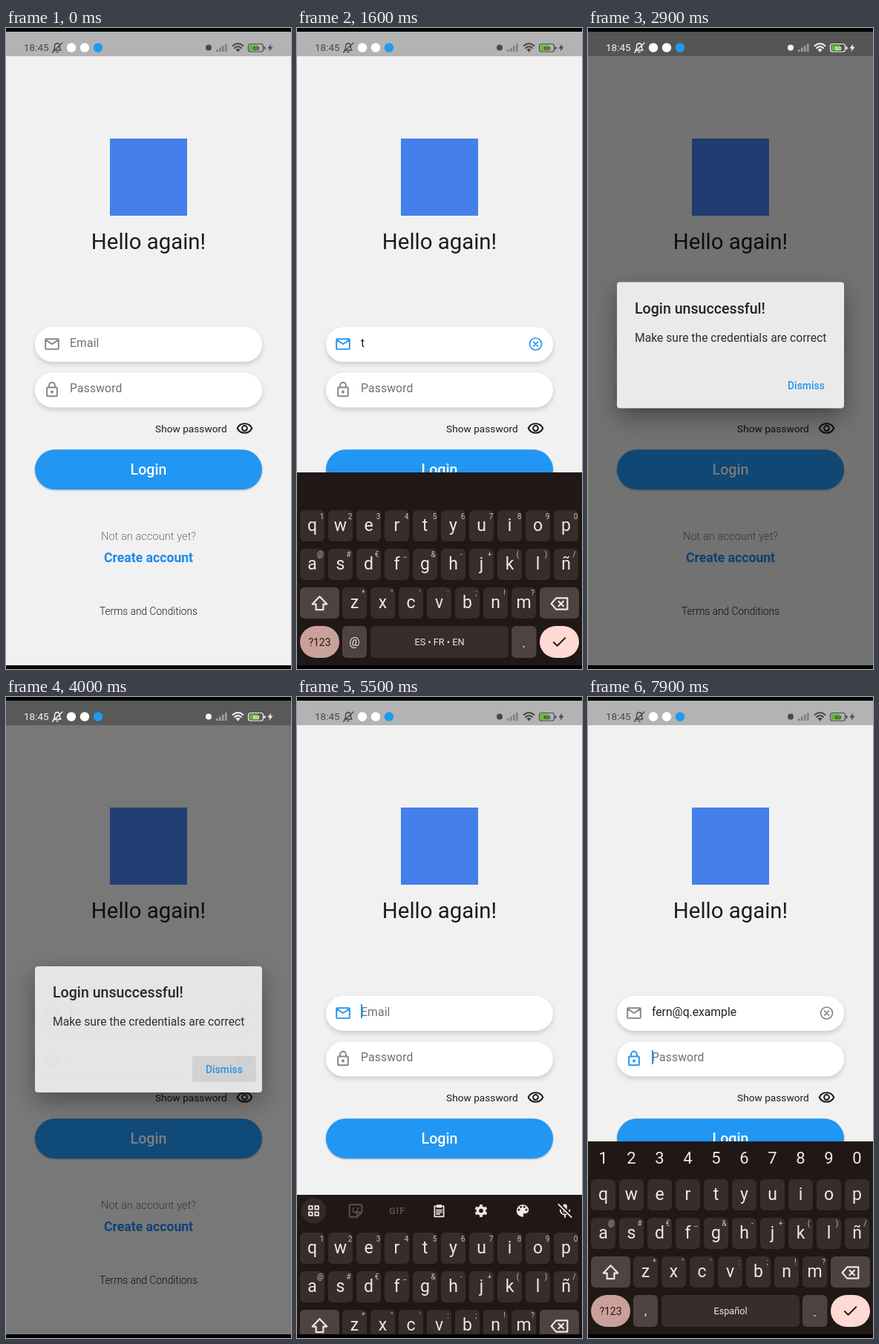
Recreate the animation shown at these times as an HTML page. Size 384x864 px, loop 8 s.

```html
<!DOCTYPE html>
<html lang="en">
<head>
<meta charset="utf-8">
<title>Login screen</title>
<style>
html, body { margin: 0; width: 100%; height: 100%; overflow: hidden; background: #000; }
svg { display: block; width: 100%; height: 100%; font-family: Roboto, "Noto Sans", sans-serif; }
.mid { text-anchor: middle; }
.line { fill: none; stroke: currentColor; stroke-width: 2; stroke-linecap: round; stroke-linejoin: round; }
.field { filter: drop-shadow(0 3px 3px rgba(0,0,0,.16)); }
.button { filter: drop-shadow(0 1.5px 1px rgba(0,0,0,.3)); }
.card { filter: drop-shadow(0 12px 16px rgba(0,0,0,.36)); }
.letter { font-size: 23px; fill: #f3e6e3; text-anchor: middle; }
.hint { font-size: 10px; fill: #cfc2bf; text-anchor: middle; }
</style>
</head>
<body>
<svg id="stage" viewBox="0 0 384 864" preserveAspectRatio="none"></svg>
<script>
const LOOP = 8000;
const EMAIL = 'fern@q.example';
const BLUE = '#2196f3', GREY = '#858585';

const rect = (x, y, w, h, r, fill, more = '') =>
  `<rect x="${x}" y="${y}" width="${w}" height="${h}" rx="${r}" fill="${fill}" ${more}/>`;
const text = (x, y, size, str, fill, more = '') =>
  `<text x="${x}" y="${y}" font-size="${size}" fill="${fill}" ${more}>${str}</text>`;
const dot = (x, y, r, fill) => `<circle cx="${x}" cy="${y}" r="${r}" fill="${fill}"/>`;
const line = (d, width = 2) => `<path class="line" d="${d}" style="stroke-width:${width}"/>`;
// 24-unit icon centred on a point
const icon = (x, y, size, body, color, id = '') =>
  `<g id="${id}" color="${color}" fill="currentColor" transform="translate(${x - size / 2} ${y - size / 2}) scale(${size / 24})">${body}</g>`;

const MAIL = line('M4 5H20Q21 5 21 6V18Q21 19 20 19H4Q3 19 3 18V6Q3 5 4 5ZM3.5 6.5L12 12L20.5 6.5');
const LOCK = line('M6 9H18Q19 9 19 10V20Q19 21 18 21H6Q5 21 5 20V10Q5 9 6 9ZM8 9V6A4 4 0 0 1 16 6V9') + dot(12, 15, 2, 'currentColor');
const EYE = line('M2 11.5C5.7 3 18.3 3 22 11.5C18.3 20 5.7 20 2 11.5Z') +
  '<circle class="line" cx="12" cy="11.5" r="3.5"/>';
const CLEAR = '<circle class="line" cx="12" cy="12" r="8.2" style="stroke-width:1.7"/>' + line('M9 9L15 15M15 9L9 15', 1.7);

function statusBar() {
  return `<g id="status" color="#484848" fill="currentColor">
    ${text(24, 31, 13.5, '18:45', 'currentColor')}
    ${line('M64 30H74L72.5 27.5V24Q72 21 69 20.5Q66 21 65.5 24V27.5ZM68 32.5H70M62.5 33L76 20', 1.4)}
    ${dot(88, 26.5, 6.2, '#fff')}${dot(106, 26.5, 6.2, '#fff')}${dot(124, 26.5, 6.2, '#1e9bf0')}
    ${dot(273, 26.5, 4, 'currentColor')}
    <g opacity=".45">${[0, 1, 2, 3].map(i => rect(283 + 4 * i, 29 - 2.6 * i, 2.6, 3 + 2.6 * i, 0, 'currentColor')).join('')}</g>
    ${line('M305.5 24Q312.5 18 319.5 24M308 27Q312.5 23 317 27', 2)}
    <path d="M309.5 29Q312.5 26.5 315.5 29L312.5 32.5Z"/>
    ${rect(326.5, 21.5, 20, 10.5, 3, 'none', 'stroke="currentColor" stroke-width="1.2"')}
    ${rect(328, 23, 12, 7.5, 1.5, '#62b830')}
    ${text(337, 29.7, 8, '60', 'currentColor', 'class="mid" font-weight="700"')}
    ${rect(347.5, 25, 2, 4, 1, 'currentColor')}
    <path d="M357 21.5L352.5 27.5H355.5L354.5 32L359.5 25.5H356.5Z"/>
  </g>`;
}

function field(name, y, glyph, label) {
  return rect(39, y, 306, 47, 23.5, '#fff', 'class="field"') +
    icon(62, y + 23, 23.5, glyph, GREY, name + 'Icon') +
    text(86, y + 26.5, 15.7, label, '#707070', `id="${name}Label" letter-spacing=".15"`) +
    text(86, y + 26.5, 15.7, '', '#202020', `id="${name}Text"`) +
    icon(321.5, y + 23, 23.5, CLEAR, GREY, name + 'Clear');
}

function page() {
  return rect(0, 5, 384, 854, 0, '#f1f1f1') + rect(0, 5, 384, 33, 0, '#b3b3b3') +
    rect(140, 149, 104, 104, 0, '#447fec') +
    text(192, 298, 29.4, 'Hello again!', '#1c1c1c', 'class="mid"') +
    field('email', 403, MAIL, 'Email') + field('pass', 464.5, LOCK, 'Password') +
    rect(86, 414, 2, 19, 0, BLUE, 'id="caret"') +
    text(201, 545, 13.7, 'Show password', '#1c1c1c') +
    icon(321.5, 540, 23.5, EYE, '#1c1c1c') +
    rect(39, 568.3, 306, 53.7, 26.85, BLUE, 'class="button"') +
    text(192, 602, 19.6, 'Login', '#fff', 'class="mid" font-weight="500"') +
    text(192, 690, 14.7, 'Not an account yet?', '#707070', 'class="mid" font-weight="300"') +
    text(192, 720, 17.64, 'Create account', '#1e88ec', 'class="mid" font-weight="700"') +
    text(192, 791, 13.72, 'Terms and Conditions', '#1c1c1c', 'class="mid" font-weight="300"');
}

function keyRow(letters, hints, x, y, hintDx, hintDy, hintId = '') {
  const col = i => x + 38 * i;
  const each = (list, fn) => [...list].map(fn).join('');
  return each(letters, (c, i) => rect(col(i) - 16.5, y, 33, 42, 6, '#372d2b') +
      `<text class="letter" x="${col(i)}" y="${y + 27.5}">${c}</text>`) +
    `<g id="${hintId}">` + each(hints, (c, i) =>
      `<text class="hint" x="${col(i) + hintDx}" y="${y + hintDy}">${c}</text>`) + '</g>';
}

function tools() {
  const ink = '#f3e6e3', dim = '#574c4a', y = 620.5;
  const squares = [[5, 5], [14, 5], [5, 14], [14, 14]]
    .map(([a, b]) => line(`M${a} ${b}h5v5h-5Z`)).join('');
  const sticker = line('M5 4H19Q20 4 20 5V14L14 20H5Q4 20 4 19V5Q4 4 5 4ZM20 14H14V20M8 12Q11 16 14 12') +
    dot(9, 9, 1.3, dim) + dot(15, 9, 1.3, dim);
  const clipboard = line('M5 5H19V21H5ZM8 11H16M8 14H16M8 17H13') + rect(8, 2.5, 8, 5, 1, 'currentColor');
  const gear = '<circle cx="12" cy="12" r="5.3" fill="none" stroke="currentColor" stroke-width="4.2"/>' +
    '<circle cx="12" cy="12" r="8.3" fill="none" stroke="currentColor" stroke-width="3" pathLength="48" stroke-dasharray="4 4" stroke-dashoffset="-2"/>';
  const palette = '<path d="M12 3a9 9 0 0 0 0 18 1.5 1.5 0 0 0 1.1-2.5c-1-1.2 0-2.5 1.1-2.5H16a5 5 0 0 0 5-5c0-4.4-4-8-9-8z"/>' +
    [[6.5, 10.5], [9.5, 6.5], [14.5, 6.5], [17.5, 10.5]].map(([a, b]) => dot(a, b, 1.5, '#1f1817')).join('');
  const mic = rect(9, 2.5, 6, 12, 3, 'currentColor') + line('M5.5 11A6.5 6.5 0 0 0 18.5 11M12 18V21') +
    '<path d="M3 2L22 21" stroke="#1f1817" stroke-width="5"/>' + line('M3 3L21 21');
  return '<g id="tools">' + dot(22.5, y, 17, '#332a28') +
    icon(22.5, y, 22, squares, ink) + icon(79, y, 25, sticker, dim) +
    text(135, 625, 13, 'GIF', dim, 'class="mid" font-weight="700" letter-spacing=".8"') +
    icon(191.5, y, 21, clipboard, ink) + icon(248, y, 21, gear, ink) +
    icon(304, y, 22, palette, ink) + icon(361, y, 23, mic, ink) + '</g>';
}

function keyboard() {
  const key = '#372d2b', special = '#4e4341', ink = '#f3e6e3';
  const digits = [...'1234567890'].map((c, i) =>
    `<text class="letter" style="font-size:22px" x="${20.5 + 38 * i}" y="629">${c}</text>`).join('');
  return '<g id="keyboard">' + rect(0, 599, 384, 262, 0, '#1f1817') +
    tools() + `<g id="digits">${digits}</g>` +
    keyRow('qwertyuiop', '1234567890', 20.5, 650, 13, 11.5, 'topHints') +
    keyRow('asdfghjklñ', '@#€_&-+()/', 20.5, 702, 11, 10.5) +
    keyRow('zxcvbnm', '*"\':;!?', 77.5, 754, 12, 11) +
    rect(4, 754, 53, 42, 6, special) + rect(327, 754, 53, 42, 6, special) +
    icon(30.5, 776, 26, line('M12 3L21 12.5H16.5V19.5H7.5V12.5H3Z'), ink) +
    icon(353.5, 776, 26, line('M8 5H22V19H8L2 12ZM11 9L17 15M17 9L11 15'), ink) +
    rect(4, 806, 53, 43, 21.5, '#caa19a') +
    text(30.5, 832.5, 14, '?123', '#2d1613', 'class="mid"') +
    rect(61, 806, 33, 43, 6, special) + text(77.5, 833, 16, '', ink, 'id="sideKey" class="mid"') +
    rect(99, 806, 186, 43, 6, key) + text(192, 832, 12.7, '', ink, 'id="spaceKey" class="mid"') +
    rect(289, 806, 33.5, 43, 6, special) + text(305.5, 835, 18, '.', ink, 'class="mid"') +
    rect(327, 806, 53, 43, 21.5, '#ffd9d3') +
    icon(353.5, 827.5, 23, line('M4 12.5L9 17.5L20 6.5'), '#2d1613') + '</g>';
}

function dialog() {
  return '<g id="dialog">' + rect(39, 363, 306, 170, 4, '#eee', 'class="card"') +
    rect(251, 484, 86, 35, 3, '#000', 'id="press" fill-opacity=".09"') +
    text(63, 405, 19.6, 'Login unsuccessful!', '#222', 'font-weight="500"') +
    text(63, 443, 15.7, 'Make sure the credentials are correct', '#2c2c2c') +
    text(269, 507, 13.72, 'Dismiss', BLUE, 'font-weight="500" letter-spacing=".1"') + '</g>';
}

document.getElementById('stage').innerHTML = page() + rect(0, 5, 384, 854, 0, '#000', 'id="barrier"') +
  statusBar() + dialog() + keyboard() + rect(0, 0, 384, 5, 0, '#000') + rect(0, 859, 384, 5, 0, '#000');

const $ = {};
document.querySelectorAll('[id]').forEach(el => { if (el.id) $[el.id] = el; });

// time, focused field, email value, password value
const steps = [
  [0, '', '', ''], [150, 'email', '', ''], [1100, 'email', 't', ''],
  [1650, 'pass', 't', ''], [2400, 'pass', 't', 'g'], [2720, '', 't', '•'],
  [4600, '', 't', ''], [5000, '', '', ''], [5300, 'email', '', ''],
  ...[...EMAIL].map((c, i) => [5900 + 100 * i, 'email', EMAIL.slice(0, i + 1), '']),
  [7550, 'pass', EMAIL, '']
];

const clamp = v => Math.min(1, Math.max(0, v));
const ramp = (t, start, length) => clamp((t - start) / length);
const easeOut = p => 1 - (1 - p) ** 2;
const show = (el, on) => el.setAttribute('visibility', on ? 'visible' : 'hidden');
const put = (el, str) => { if (el.textContent !== str) el.textContent = str; };

function drawField(name, value, focused) {
  const color = focused ? BLUE : GREY;
  put($[name + 'Text'], value);
  show($[name + 'Label'], !value);
  show($[name + 'Clear'], value);
  $[name + 'Icon'].setAttribute('color', color);
  $[name + 'Clear'].setAttribute('color', color);
}

function render(t) {
  const [since, focus, email, pass] = steps.filter(s => s[0] <= t).pop();
  drawField('email', email, focus === 'email');
  drawField('pass', pass, focus === 'pass');

  show($.caret, focus && (t - since) % 1000 < 500);
  if (focus) {
    $.caret.setAttribute('x', 86 + $[focus + 'Text'].getComputedTextLength());
    $.caret.setAttribute('y', focus === 'email' ? 414 : 476);
  }

  const up = t < 2720 ? easeOut(ramp(t, 300, 210))
    : t < 5000 ? 1 - ramp(t, 2720, 160)
    : easeOut(ramp(t, 5402, 208));
  const open = up > 0;
  $.keyboard.setAttribute('transform', `translate(0 ${Math.round(262 * (1 - up))})`);
  show($.keyboard, open);

  const passMode = t >= 1650 && t < 5300 || t >= 7550;
  show($.tools, open && !passMode && !email);
  show($.digits, open && passMode && !pass);
  show($.topHints, open && !passMode);
  put($.sideKey, passMode ? ',' : '@');
  put($.spaceKey, passMode ? 'Español' : 'ES • FR • EN');

  const fade = Math.min(ramp(t, 2760, 145), 1 - ramp(t, 3990, 150));
  const lift = 120 * (1 - ramp(t, 2760, 240)) ** 2;
  $.barrier.setAttribute('opacity', 0.54 * fade);
  $.dialog.setAttribute('opacity', fade);
  $.dialog.setAttribute('transform', `translate(0 ${-lift})`);
  show($.press, fade > 0 && t >= 3850);
  $.status.setAttribute('color', fade > 0.5 ? '#f4f4f4' : '#484848');
}

function tick() {
  render(performance.now() % LOOP);
  requestAnimationFrame(tick);
}
tick();
</script>
</body>
</html>
```
